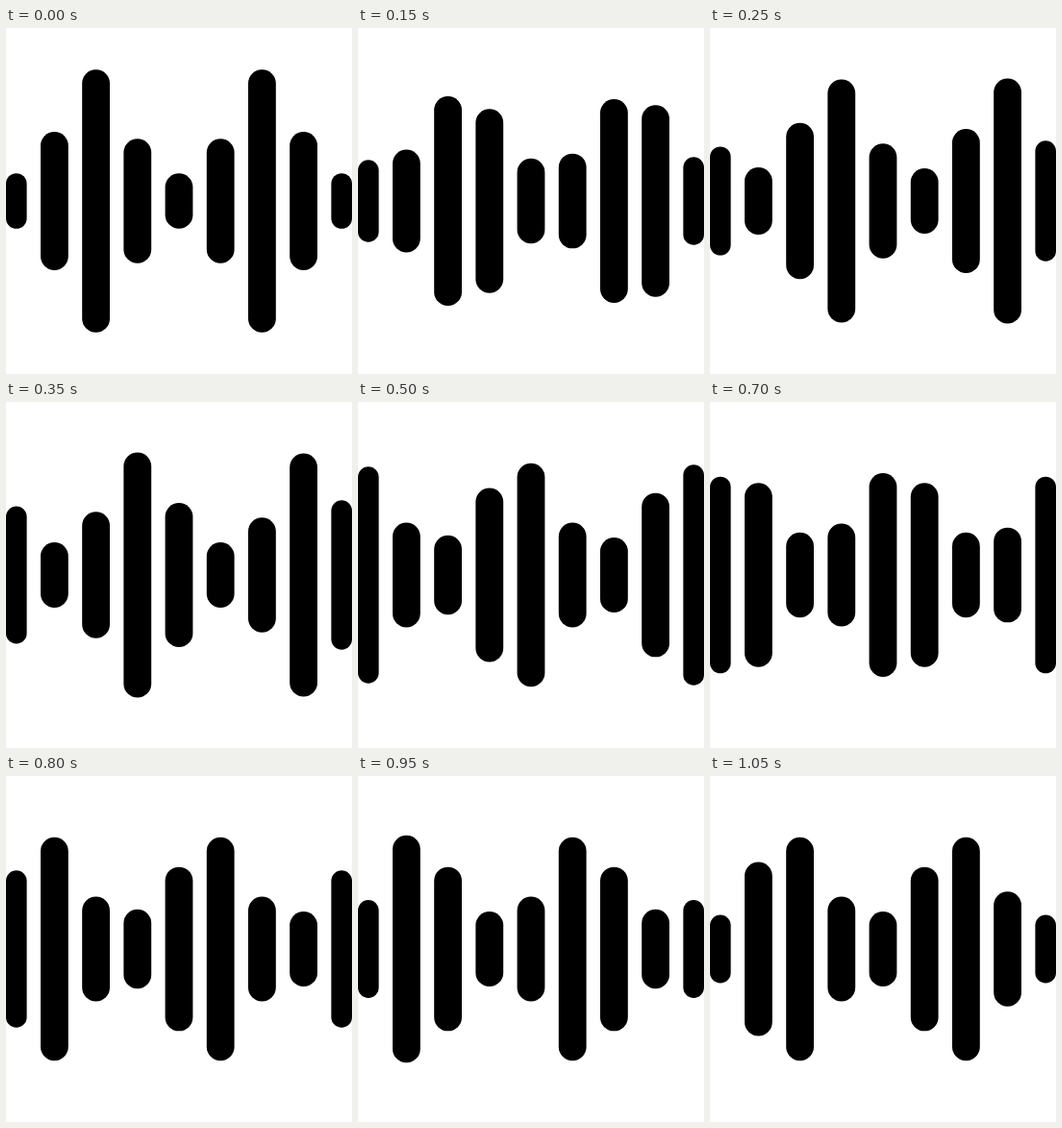
Recreate the animation shown at these times as an HTML page. Size 360x360 px, loop 1100 ms.

```html
<!DOCTYPE html>
<html lang="en">
<head>
<meta charset="utf-8">
<title>Sound bars</title>
<style>
  html, body { margin: 0; width: 100%; height: 100%; overflow: hidden; background: #fff; }
  svg { display: block; width: 100vw; height: 100vh; }
</style>
</head>
<body>
<svg id="stage" viewBox="0 0 360 360"></svg>
<script>
const LOOP = 1100, STEP = 50, STEPS = LOOP / STEP;
const SEGMENT = 7; // poses between two neighbouring keys

// Top edges at the five keys of the loop; each bar mirrors around y = 180.
const HIGH = 43.2, MID = 108, LOW = 115.2, REST = 151.2;
const KEYS = [
  [151.2, 118.8, 46.8, 118.8, 154.8],
  [MID, REST, LOW, HIGH, MID],
  [HIGH, MID, REST, LOW, HIGH],
  [LOW, HIGH, MID, REST, LOW],
  [REST, LOW, HIGH, LOW, REST],
  [LOW, REST, LOW, HIGH, LOW],
  [HIGH, LOW, REST, LOW, HIGH],
  [MID, HIGH, LOW, REST, MID],
  [151.2, 111.6, 46.8, 118.8, 154.8]
];

const stage = document.getElementById("stage");

function setAttrs(el, attrs) {
  for (const name in attrs) el.setAttribute(name, attrs[name]);
}

const bars = KEYS.map((keys, i) => {
  const el = document.createElementNS("http://www.w3.org/2000/svg", "rect");
  const edge = i === 0 || i === KEYS.length - 1;
  const width = edge ? 21.6 : 28.8;
  const x = i === 0 ? 0 : edge ? 360 - width : 36 + 43.2 * (i - 1);
  setAttrs(el, { x, width, rx: width / 2, fill: "#000" });
  stage.append(el);
  return { el, keys };
});

// The motion skips every fifth pose, so it advances unevenly.
function poseAt(ms) {
  const step = Math.floor((ms % LOOP) / STEP);
  return Math.floor(step * 26 / (STEPS - 1));
}

function draw(ms) {
  const pose = poseAt(ms);
  const k = Math.floor(pose / SEGMENT);
  const part = (pose % SEGMENT) / SEGMENT;
  for (const { el, keys } of bars) {
    const y = keys[k] + (keys[k + 1] - keys[k]) * part;
    setAttrs(el, { y, height: 360 - 2 * y });
  }
}

const start = performance.now();
function tick() {
  draw(performance.now() - start);
  requestAnimationFrame(tick);
}
tick();
</script>
</body>
</html>
```
